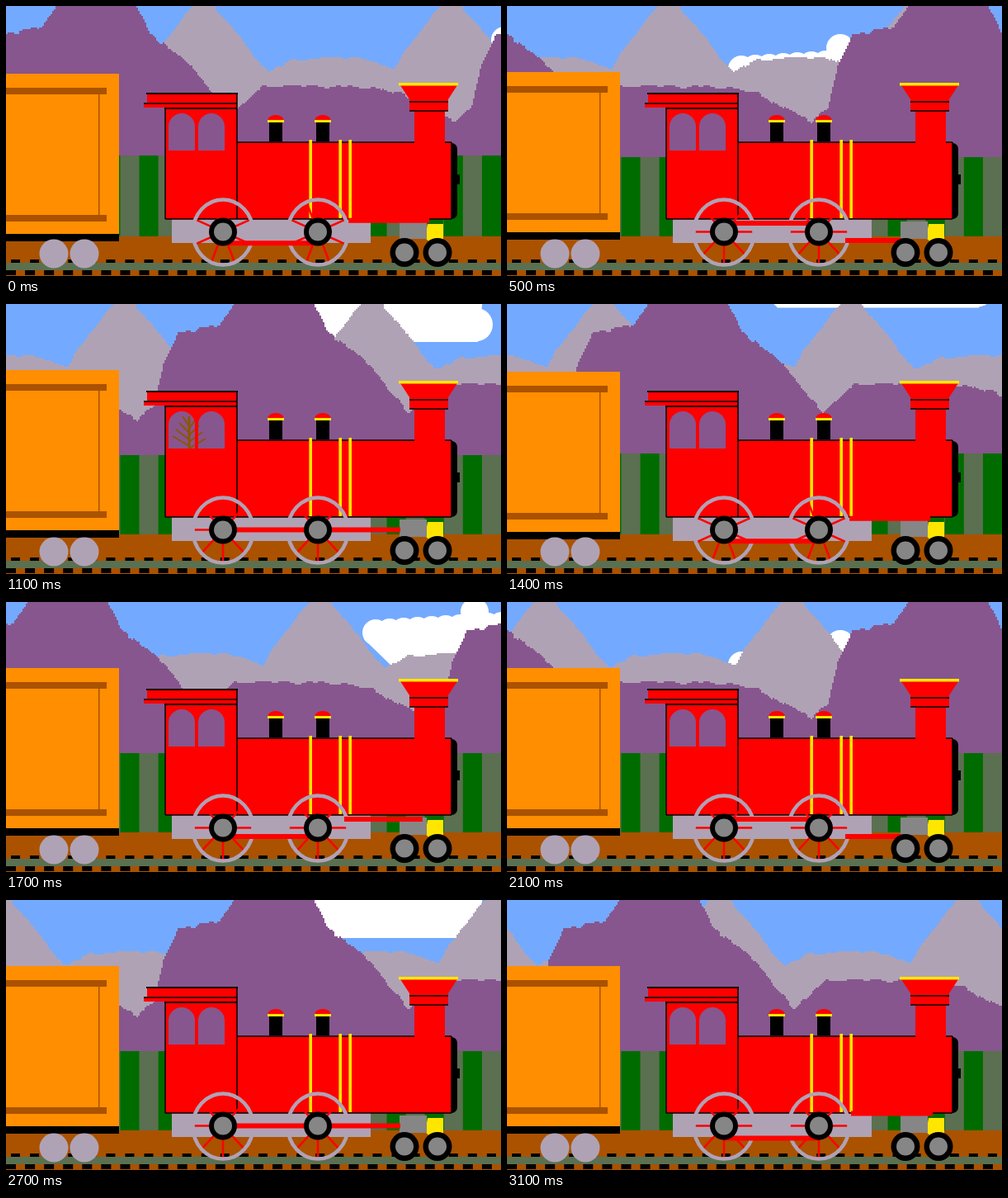
An HTML page with a canvas that plays this animation: 600 px wide and 327 px high, repeating every 3.2 s.

```html
<!DOCTYPE html>
<html lang="en">
<head>
<meta charset="utf-8">
<title>Steam train</title>
<style>
  html, body { margin: 0; width: 100%; height: 100%; overflow: hidden; background: #73aaff; }
  canvas { display: block; width: 600px; height: 327px; }
</style>
</head>
<body>
<canvas id="stage" width="600" height="327"></canvas>
<script>
const ctx = document.getElementById('stage').getContext('2d');

const SKY = '#73aaff', PURPLE = '#87568e', LILAC = '#b0a2b5', GREEN = '#006c00', SAGE = '#5b7050';
const EARTH = '#aa5200', ORANGE = '#ff8e00', RED = '#ff0000', YELLOW = '#ffe600', STEEL = '#868686';
const BLACK = '#000', WHITE = '#fff', BARK = '#8e5500';
const STEP_MS = 100, STEPS = 32, HALF_LOOP = 16, STRIPE = 600 / 26;

// Key points [x, y] of one period of each ridge.
const nearRidge = [
  [0, 36], [42, 66], [97, 131], [135, 97], [270, 98], [304, 106], [325, 119], [368, 140],
  [388, 122], [400, 74], [418, 36], [468, 26], [490, -6], [579, -6], [600, 36]
];
const farRidge = [[125, 78], [140, 52], [184, -2], [206, -2], [272, 79], [300, 66], [385, 62], [425, 78]];
// Cloud tip as [step, x, y].
const cloudPath = [[0, 588, 47], [1, 432, 43], [5, 268, 82], [11, 290, 9], [HALF_LOOP, 290, -60]];

function rect(x, y, w, h, color) {
  ctx.fillStyle = color;
  ctx.fillRect(x, y, w, h);
}

function polygon(points, color) {
  ctx.fillStyle = color;
  ctx.beginPath();
  for (const [x, y] of points) ctx.lineTo(x, y);
  ctx.fill();
}

function disc(x, y, r, color) {
  ctx.fillStyle = color;
  ctx.beginPath();
  ctx.arc(x, y, r, 0, Math.PI * 2);
  ctx.fill();
}

function line(x1, y1, x2, y2, width, color) {
  ctx.strokeStyle = color;
  ctx.lineWidth = width;
  ctx.beginPath();
  ctx.moveTo(x1, y1);
  ctx.lineTo(x2, y2);
  ctx.stroke();
}

const modulo = (a, n) => ((a % n) + n) % n;

// Seeded random number in 0..1.
const random = seed => modulo(Math.sin(seed * 12.9898) * 43758.5453, 1);

// Linear interpolation through rows of [key, value, ...].
function sample(rows, key, column = 1) {
  const i = Math.max(1, rows.findIndex(row => row[0] >= key));
  const a = rows[i - 1], b = rows[i];
  return a[column] + (b[column] - a[column]) * (key - a[0]) / (b[0] - a[0]);
}

// Mountains with small random ledges, drawn in coarse pixels.
function ridge(points, shift, color) {
  const start = points[0][0], period = points[points.length - 1][0] - start;
  const pixel = 2, ledge = 7;
  for (let x = 0; x < 600; x += pixel) {
    const u = start + modulo(x + shift - start, period);
    const rough = 4 * random(Math.floor(u / ledge)) - 2;
    const y = Math.round((sample(points, u) + rough) / pixel) * pixel;
    rect(x, y, pixel, 184 - y, color);
  }
}

function drawCloud(phase) {
  ctx.save();
  ctx.translate(sample(cloudPath, phase), sample(cloudPath, phase, 2));
  for (let i = 0; i < 16; i++) disc(16 + 17 * i, -6 - i, 16, WHITE);
  disc(136, -31, 17, WHITE);
  disc(280, 16, 20, WHITE);
  polygon([[2, 2], [38, 37], [282, 37], [288, -16]], WHITE);
  ctx.restore();
}

function drawTree(x) {
  line(x, 136, x, 183, 3, BARK);
  for (let i = 0; i < 4; i++) {
    const y = 148 + 8 * i, reach = 8 + 4 * i;
    line(x, y, x - reach, y - 12, 2, BARK);
    line(x, y + 3, x + reach, y - 9, 2, BARK);
  }
}

function drawScenery(step) {
  const odd = step % 2;
  const scroll = 35 * step + (step >= HALF_LOOP ? 40 : 0) - 175;
  rect(0, 0, 600, 327, SKY);
  drawCloud(step % HALF_LOOP);
  ridge(farRidge, scroll / 4, LILAC);
  ridge(nearRidge, scroll, PURPLE);
  for (let i = 0; i < 26; i++) {
    rect(i * STRIPE, odd ? 183 : 181, STRIPE + 0.5, 98, (i + odd) % 2 ? GREEN : SAGE);
  }
  drawTree(222 - (step - 11) * 3 * STRIPE);

  rect(0, 279, 600, 48, EARTH);
  rect(0, 311, 600, 9, SAGE);
  for (let i = 0; i < 26; i++) {
    rect(i * STRIPE + 6, 307, 11, 4, BLACK);
    rect(i * STRIPE, 320, 12, 6, BLACK);
  }
}

function drawWagon(bob) {
  rect(0, 80 + bob, 137, 195, ORANGE);
  for (const y of [97, 251]) rect(0, y + bob, 122, 8, EARTH);
  rect(112, 105 + bob, 1.5, 146, EARTH);
  rect(0, 274 + bob, 137, 9, BLACK);
  for (const x of [58, 95]) disc(x, 300, 17.5, LILAC);
}

function drawCab() {
  ctx.fillStyle = RED;
  ctx.beginPath();
  ctx.rect(193, 124, 87, 134);
  for (const x of [213, 249]) {
    ctx.moveTo(x - 16, 175);
    ctx.arc(x, 146, 16, Math.PI, 0);
    ctx.lineTo(x + 16, 175);
    ctx.closePath();
  }
  ctx.fill('evenodd');
  rect(171, 106, 109, 13, RED);
  rect(167, 118, 113, 5, RED);
  line(170, 106, 281, 106, 2, BLACK);
  line(167, 118, 280, 118, 1.5, BLACK);
  line(192, 124, 280, 124, 2, BLACK);
  line(193, 123, 193, 258, 1.5, BLACK);
}

function drawBoiler() {
  ctx.fillStyle = BLACK;
  ctx.beginPath();
  ctx.roundRect(530, 166, 17, 92, 7);
  ctx.fill();
  rect(546, 204, 4, 12, BLACK);
  rect(280, 165, 260, 93, RED);
  line(280, 165, 540, 165, 1.5, BLACK);
  line(193, 258, 540, 258, 1.5, BLACK);
  line(280, 106, 280, 258, 1.5, BLACK);
  line(540, 165, 540, 258, 1.5, BLACK);

  for (const x of [327, 384]) {
    rect(x - 8, 140, 16, 24, BLACK);
    ctx.fillStyle = RED;
    ctx.beginPath();
    ctx.ellipse(x, 139, 10, 7, 0, Math.PI, 0);
    ctx.fill();
    rect(x - 10, 138, 20, 3, YELLOW);
  }
  for (const x of [367, 403, 415]) {
    rect(x, 162, 4, 95, YELLOW);
    rect(x, 162, 1, 95, ORANGE);
  }

  rect(495, 126, 37, 40, RED);
  rect(489, 112, 47, 15, RED);
  polygon([[478, 96], [547, 96], [536, 113], [489, 113]], RED);
  for (const y of [116, 127]) line(489, y, 536, y, 1.5, BLACK);
  rect(476, 93, 72, 3.5, YELLOW);
}

function drawRunningGear(step) {
  const angle = Math.PI / 8 * (step + 5);
  const dx = Math.cos(angle), dy = Math.sin(angle);
  const hubs = [263, 378], hubY = 273.5, throwRadius = 15;
  const pinY = hubY + throwRadius * dy, rodY = hubY - throwRadius * dy;
  const pins = hubs.map(x => x + throwRadius * dx);

  for (const x of hubs) {
    for (let i = 0; i < 8; i++) {
      const a = angle + i * Math.PI / 4;
      line(x, hubY, x + 36 * Math.cos(a), hubY + 39 * Math.sin(a), 2.5, RED);
    }
    ctx.strokeStyle = LILAC;
    ctx.lineWidth = 4.5;
    ctx.beginPath();
    ctx.ellipse(x, 274, 36.5, 39.5, 0, 0, Math.PI * 2);
    ctx.stroke();
  }

  const rodEnd = 478 + 38 * Math.max(0, dy);
  line(pins[0], pinY, pins[1], pinY, 6, RED);
  line(Math.max(pins[1], 393 + 24 * Math.abs(dy)), rodY, rodEnd, rodY, 6, RED);

  for (const x of hubs) {
    disc(x, hubY, 17, BLACK);
    disc(x, hubY, 11, STEEL);
  }
  for (const x of pins) disc(x, pinY, 2, BLACK);
}

function drawTrain(step) {
  drawWagon(step % 2 ? 0 : 2);
  rect(201, 258, 241, 29, LILAC);
  rect(508, 258, 22, 7, GREEN);
  polygon([[511, 264], [530, 264], [530, 288], [516, 288], [508, 281]], YELLOW);
  rect(477, 261, 33, 21, STEEL);
  drawCab();
  drawBoiler();
  drawRunningGear(step);
  for (const x of [483, 523]) {
    disc(x, 298.5, 17.5, BLACK);
    disc(x, 298.5, 11, STEEL);
  }
}

function render() {
  const step = Math.floor(performance.now() / STEP_MS) % STEPS;
  drawScenery(step);
  drawTrain(step);
  requestAnimationFrame(render);
}
render();
</script>
</body>
</html>
```
